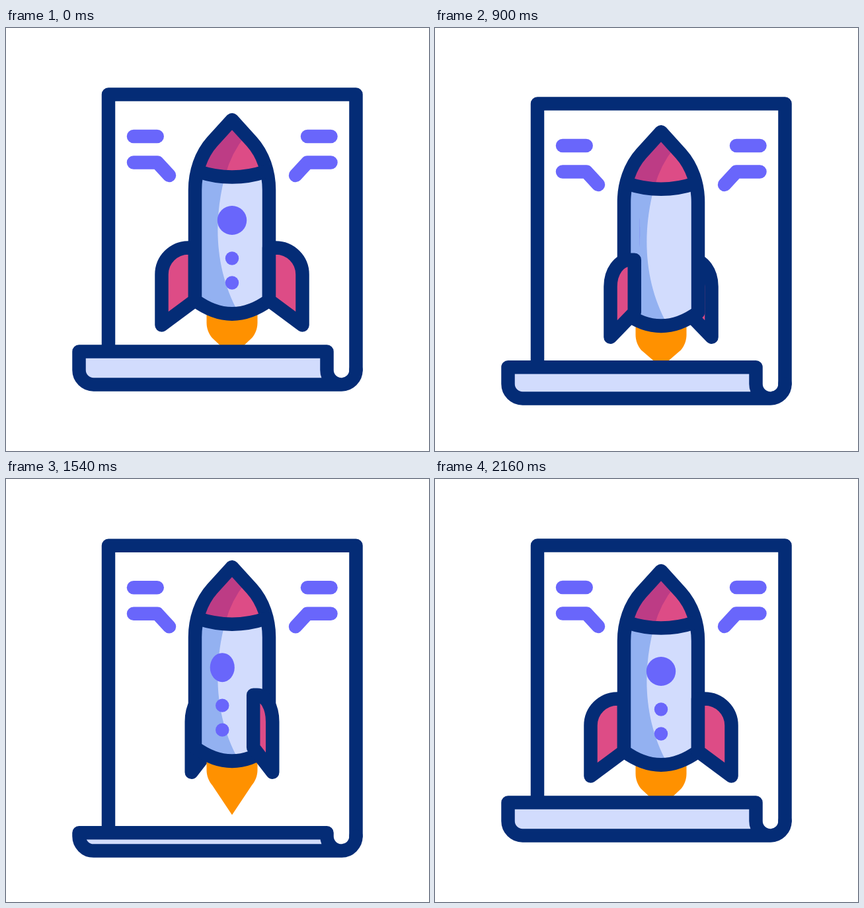
An HTML page that plays this animation: 640 px wide and 640 px high, repeating every 2500 ms.

```html
<!DOCTYPE html>
<html lang="en">
<head>
<meta charset="utf-8">
<title>Rocket blueprint</title>
<style>
  html, body { margin: 0; width: 100%; height: 100%; overflow: hidden; background: #fff; }
  svg { display: block; width: 100%; height: 100%; }
  .line { stroke: #042c76; stroke-width: 20.5; stroke-linecap: round; stroke-linejoin: round; }
  .ray { fill: none; stroke: #6966fb; stroke-width: 20.5; stroke-linecap: round; stroke-linejoin: round; }
  .glow { stroke: #ffcc52; stroke-width: 22.8; }
  .pink { fill: #dd4c86; }
  .pale { fill: #d2dcfd; }
  .none { fill: none; }
</style>
</head>
<body>
<svg viewBox="0 0 640 640">
  <defs>
    <path id="hull" d="M342 139L312 172C295 191 286 218 286 245V412Q342 453 398 412V245C398 218 389 191 372 172Z"/>
    <clipPath id="inside"><use href="#hull"/></clipPath>
  </defs>
  <path id="sheet" class="line none"/>
  <g id="rays"></g>
  <g id="rocket">
    <path id="backFin" class="line pink"/>
    <path id="flame" fill="#ff9100"/>
    <g clip-path="url(#inside)">
      <path class="pink" d="M280 120H404V240H280Z"/>
      <path fill="#bd3c85" d="M280 120H380L362 163Q341 189 332 222L330 240H280Z"/>
      <path class="pale" d="M280 213L288 216Q342 235 396 216L404 213V460H280Z"/>
      <path fill="#93b1f1" d="M280 213L288 216Q310 224 331 225C314 290 315 365 352 431V460H280Z"/>
    </g>
    <g id="windows" fill="#6966fb">
      <ellipse cy="291" ry="22"/>
      <ellipse cy="348.5" ry="10.2"/>
      <ellipse cy="385.5" ry="10.2"/>
    </g>
    <use href="#hull" class="line none"/>
    <path class="line none" d="M290 216.7Q342 234.3 394 216.7"/>
    <path id="frontFin" class="line pink"/>
  </g>
  <path id="rollFill" class="pale"/>
  <path id="roll" class="line none"/>
</svg>
<script>
const LOOP = 2500;
const $ = id => document.getElementById(id);
const set = (el, attrs) => { for (const k in attrs) el.setAttribute(k, attrs[k]); };
const rad = deg => deg * Math.PI / 180;
const smooth = u => u * u * (3 - 2 * u);

function bezier(x1, y1, x2, y2) {
  const at = (a, b, s) => 3 * a * s * (1 - s) ** 2 + 3 * b * s * s * (1 - s) + s ** 3;
  return u => {
    let lo = 0, hi = 1;
    for (let i = 0; i < 24; i++) {
      const mid = (lo + hi) / 2;
      if (at(x1, x2, mid) < u) lo = mid; else hi = mid;
    }
    return at(y1, y2, lo);
  };
}
const settle = bezier(.25, .05, .27, 1);

// Keys are [time, value, easing of the stretch that ends here].
function track(t, keys) {
  if (t <= keys[0][0]) return keys[0][1];
  for (let i = 1; i < keys.length; i++) {
    const [t0, v0] = keys[i - 1], [t1, v1, ease = smooth] = keys[i];
    if (t < t1) return v0 + (v1 - v0) * ease((t - t0) / (t1 - t0));
  }
  return keys[keys.length - 1][1];
}

// Monotone cubic curve through rising points, at rest on both ends.
function glide(t, pts) {
  const last = pts.length - 1;
  if (t <= pts[0][0]) return pts[0][1];
  if (t >= pts[last][0]) return pts[last][1];
  const rate = i => (pts[i + 1][1] - pts[i][1]) / (pts[i + 1][0] - pts[i][0]);
  const slope = i => i === 0 || i === last ? 0 : 2 / (1 / rate(i - 1) + 1 / rate(i));
  let i = 0;
  while (t >= pts[i + 1][0]) i++;
  const [t0, v0] = pts[i], [t1, v1] = pts[i + 1];
  const h = t1 - t0, u = (t - t0) / h;
  return v0 + (v1 - v0) * smooth(u)
    + h * u * (1 - u) * (slope(i) * (1 - u) - slope(i + 1) * u);
}

const SHEET_Y = [[220, 0], [680, 24], [1500, 0, settle], [1520, 0], [1820, 24], [2160, 0]];
const ROCKET_Y = [[220, 0], [680, 35.5], [1500, -6, settle], [1530, -6], [1820, 30], [2160, 0]];
const rollKeys = (tight, loose) =>
  [[220, 0], [492, tight], [1175, loose], [1510, loose], [1825, tight], [2035, 0]];
const ROLL_BOTTOM = rollKeys(-24.5, 24.2);
const ROLL_TOP = rollKeys(-60.5, 48.3);
const FLAME_TIP = [[220, 497], [900, 495], [1280, 494], [1540, 514], [1820, 497]];
const SPIN = [[220, 0], [680, 44.5], [900, 135.5], [1280, 293.8], [1540, 414.4], [1820, 564.4], [2160, 720]];
const WINDOW_SPIN = [[220, 0], [680, 55], [900, 89.4], [1200, 270.5], [1280, 297],
  [1540, 393], [1680, 449.6], [1820, 631], [2160, 720]];

const rayPaths = ["M228.7 164H193", "M247 223L229 203.5H193", "M456 164H491.5", "M438 223L456 203.5H491.5"];
const addRay = (d, cls) => {
  const p = document.createElementNS("http://www.w3.org/2000/svg", "path");
  set(p, { d, class: cls });
  return $("rays").appendChild(p);
};
rayPaths.forEach(d => addRay(d, "ray"));
const glows = rayPaths.map(d => addRay(d, "ray glow"));

function finPath(c) {
  const x = r => 342 + r * c;
  return `M${x(56)} 332.5H${x(66)}C${x(88.4)} 332.5 ${x(106.5)} 350.6 ${x(106.5)} 373V449.5L${x(56)} 412Z`;
}

function drawScroll(t) {
  const y = track(t, SHEET_Y);
  const top = 100.5 + y;
  const bottom = 539.4 + y + track(t, ROLL_BOTTOM);
  const lip = 489.5 + y + track(t, ROLL_TOP);
  const bend = bottom - 22;
  set($("sheet"), { d: `M155 ${lip}V${top}H529.5V${bend}` });
  const curl = `M529.5 ${bend}a22 22 0 0 1 -44 0V${lip}H110.5V${bend}a22 22 0 0 0 22 22H507.5`;
  set($("roll"), { d: curl });
  set($("rollFill"), { d: `M507.5 ${bottom}a22 22 0 0 1 -22 -22V${lip}H110.5V${bend}a22 22 0 0 0 22 22Z` });
  set($("rays"), { transform: `translate(0 ${y})` });
}

function drawGlow(t) {
  const head = track(t, [[1640, 0], [1850, 1]]);
  const tail = track(t, [[1850, 0], [2100, 1]]);
  for (const p of glows) {
    const len = p.getTotalLength();
    const shown = (head - tail) * len;
    set(p, {
      visibility: shown > 0.1 ? "visible" : "hidden",
      "stroke-dasharray": `${shown} ${len * 2}`,
      "stroke-dashoffset": -tail * len
    });
  }
}

function drawRocket(t) {
  set($("rocket"), { transform: `translate(0 ${track(t, ROCKET_Y)})` });

  const c = Math.cos(rad(glide(t, SPIN) % 180));
  set($("frontFin"), { d: finPath(c) });
  set($("backFin"), { d: finPath(-c) });

  const tip = track(t, FLAME_TIP);
  set($("flame"), {
    d: `M303.5 425V446C303.5 455 307 463 312 469L342 ${tip}L372 469C377 463 380.5 455 380.5 446V425Z`
  });

  let a = glide(t, WINDOW_SPIN) % 360;
  if (a > 180) a -= 360;
  const width = Math.max(0, 22.2 * Math.cos(rad(a)));
  const shift = a > 0 ? -34.8 * Math.sin(rad(.75 * a)) : 33.4 * Math.sin(rad(-1.28 * a));
  for (const el of $("windows").children) {
    const ry = +el.getAttribute("ry");
    set(el, { cx: 342 + shift, rx: ry > 20 ? width : Math.min(ry, width) });
  }
}

function draw(t) {
  drawScroll(t);
  drawGlow(t);
  drawRocket(t);
}

const start = performance.now();
function tick() {
  draw((performance.now() - start) % LOOP);
  requestAnimationFrame(tick);
}
tick();
</script>
</body>
</html>
```
